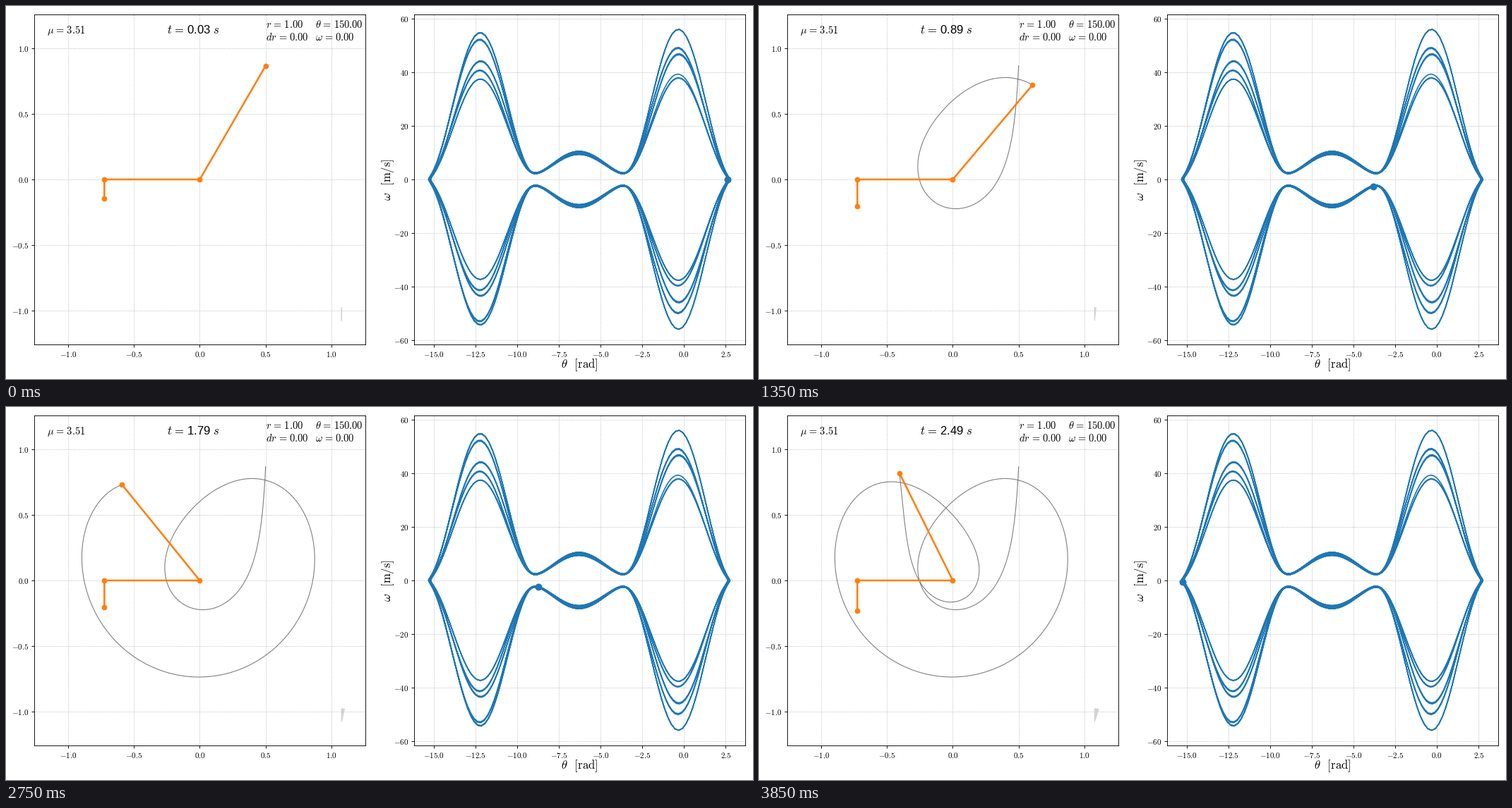
Animation, 1058 px wide and 529 px high, one loop 3900 ms. Source, as a matplotlib script:

```python
import numpy as np
import matplotlib.pyplot as plt
from matplotlib.animation import FuncAnimation
from matplotlib.patches import Wedge

W, H, DPI = 1058, 529, 80
FRAMES, INTERVAL = 78, 50
MU, G = 3.51, 9.81
R0, THETA0 = 1.0, np.radians(150)
DT, T_END = 0.001, 50.0
STRIDE = 32             # integration steps per frame
CLOCK_LEAD = 0.03       # the clock runs slightly ahead of the motion
ROPE, PULLEY = 1.145, -0.725

plt.rcParams["mathtext.fontset"] = "cm"


def deriv(s):
    r, dr, th, om = s
    return np.array([
        dr,
        (r * om * om + G * (np.cos(th) - MU)) / (1 + MU),
        om,
        -(2 * dr * om + G * np.sin(th)) / r,
    ])


def integrate():
    s = np.array([R0, 0.0, THETA0, 0.0])
    out = [s]
    for _ in range(int(T_END / DT)):
        k1 = deriv(s)
        k2 = deriv(s + DT / 2 * k1)
        k3 = deriv(s + DT / 2 * k2)
        k4 = deriv(s + DT * k3)
        s = s + DT / 6 * (k1 + 2 * k2 + 2 * k3 + k4)
        out.append(s)
    return np.array(out).T


r, dr, theta, omega = integrate()
x, y = r * np.sin(theta), -r * np.cos(theta)

fig = plt.figure(figsize=(W / DPI, H / DPI), dpi=DPI, facecolor="white")


def panel(left, right, xlim, ylim, xticks, yticks, yfmt):
    top, bottom = 12, 480
    ax = fig.add_axes([left / W, 1 - bottom / H, (right - left) / W, (bottom - top) / H])
    ax.set(xlim=xlim, ylim=ylim)
    ax.set_xticks(xticks, [f"${v:.1f}$" for v in xticks])
    ax.set_yticks(yticks, [f"${v:{yfmt}}$" for v in yticks])
    ax.grid(linestyle=":")
    ax.set_axisbelow(True)
    return ax


def label(px, py, text, size, **kw):
    return fig.text(px / W, 1 - py / H, text, fontsize=size, va="baseline", **kw)


EQ = r"\hspace{0.117}=\hspace{0.117}"


def equation(name, value):
    return f"${name}{EQ}{value}$"


ticks = np.arange(-1, 1.1, 0.5)
LIM = 1.257
left = panel(40.1, 508.8, (-LIM, LIM), (-LIM, LIM), ticks, ticks, ".1f")
right = panel(578.1, 1047, (-16.18, 3.67), (-61.6, 61.6),
              np.arange(-15, 3, 2.5), np.arange(-60, 61, 20), ".0f")

label(58.5, 39, equation(r"\mu", "3.51"), 13)
label(368, 31, equation("r", "1.00"), 13)
label(368, 49, equation("dr", "0.00"), 13)
label(438, 31, equation(r"\theta", "150.00"), 13)
label(438, 49, equation(r"\omega", "0.00"), 13)
label(786, 513, r"$\theta\hspace{0.76}\mathrm{[rad]}$", 15)
label(545, 276, r"$\omega\hspace{0.76}\mathrm{[m/s]}$", 15,
      rotation=90, rotation_mode="anchor")
clock = label(227.5, 39, "", 15, family="Liberation Sans")

trace, = left.plot([], [], color="gray", lw=1)
rods, = left.plot([], [], "o-", color="tab:orange", lw=2.3, ms=6)
pie = left.add_patch(Wedge((1.077, -1.077), 0.1, 90, 90, color="lightgray"))

right.plot(theta[::4], omega[::4], color="tab:blue", lw=1.5)
dot, = right.plot([], [], "o", color="tab:blue", ms=8)


def update(i):
    n = STRIDE * i
    t = n * DT + CLOCK_LEAD
    trace.set_data(x[:n + 1], y[:n + 1])
    rods.set_data([x[n], 0, PULLEY, PULLEY], [y[n], 0, 0, r[n] - ROPE])
    dot.set_data([theta[n]], [omega[n]])
    pie.set_theta1(90 - 360 * t / T_END)
    clock.set_text(f"$t{EQ}${t:.2f} $s$")
    return trace, rods, dot, pie, clock


anim = FuncAnimation(fig, update, frames=FRAMES, interval=INTERVAL, repeat=True)
plt.show()
```
